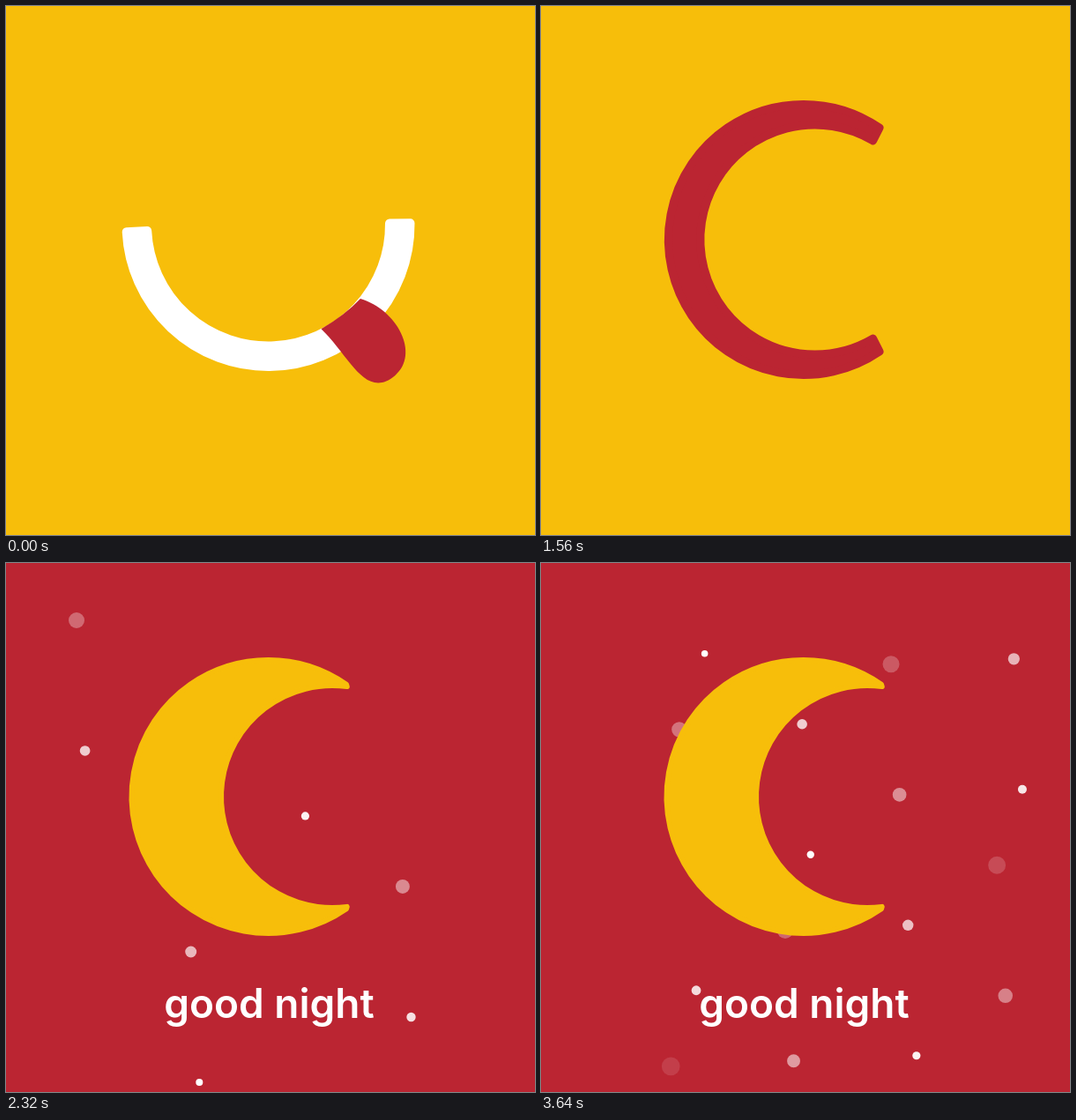
An HTML page with a canvas for the animation above (3680 ms loop, 600 px wide and 600 px high).

```html
<!DOCTYPE html>
<html lang="en">
<head>
<meta charset="utf-8">
<title>Good night</title>
<style>
html, body { margin: 0; width: 100%; height: 100%; overflow: hidden; background: #f7be0a; }
canvas { display: block; }
</style>
</head>
<body>
<canvas id="stage" width="600" height="600"></canvas>
<script>
const c = document.getElementById('stage').getContext('2d');
const YELLOW = '#f7be0a', RED = '#bb2532', LOOP = 3680, CX = 297.5;
const rad = d => d * Math.PI / 180;
const mix = (a, b, k) => a + (b - a) * k;
const clamp = k => Math.max(0, Math.min(1, k));
const ease = (t, from, to) => {
  const u = clamp((t - from) / (to - from));
  return u * u * (3 - 2 * u);
};

// Smooth curve through [time, value] points, flat at extremes and ends.
function track(...p) {
  const slope = i => {
    if (i < 1 || i > p.length - 2) return 0;
    const a = (p[i][1] - p[i - 1][1]) / (p[i][0] - p[i - 1][0]);
    const b = (p[i + 1][1] - p[i][1]) / (p[i + 1][0] - p[i][0]);
    return a * b <= 0 ? 0 : 2 * a * b / (a + b);
  };
  return t => {
    if (t <= p[0][0]) return p[0][1];
    const i = p.findIndex(q => q[0] >= t) - 1;
    if (i < 0) return p[p.length - 1][1];
    const [t0, a] = p[i], [t1, b] = p[i + 1], d = t1 - t0, u = (t - t0) / d;
    return mix(a, b, ease(u, 0, 1)) + d * u * (1 - u) * (slope(i) * (1 - u) - slope(i + 1) * u);
  };
}

const lick = track([360, 50], [520, -14], [640, 24.5], [720, 117], [880, 192], [1160, 294], [1240, 304], [1440, 294]);
const tailAngle = track([360, -2.5], [520, -25], [640, -8.5], [1040, 70], [1160, 54]);
const wax = track([1440, 0], [1840, .88], [2240, 1]);
const wobble = track([1520, 0], [1840, 1.2], [2000, -1.4], [2280, 0]);

// Evenly scattered dots, born one after another; each grows while it fades.
const STARS = 46, LIFE = 560, FIRST = 1880;
function drawStars(t) {
  c.fillStyle = '#fff';
  for (let i = 0; i < STARS; i++) {
    const age = (t - FIRST - (LOOP - FIRST) * (i / STARS) ** .8) / LIFE;
    if (age < 0 || age > 1) continue;
    c.globalAlpha = clamp(1.1 - age);
    c.beginPath();
    c.arc(80 + i * .7549 % 1 * 490, 65 + i * .5698 % 1 * 530, 3.5 + 7 * age, 0, 7);
    c.fill();
  }
  c.globalAlpha = 1;
}

// Ring segment with rounded corners; its inner circle slides right to form the moon.
function drawArc(m, color) {
  const w = mix(5, 3, m.wax), ro = m.outer - w, ri = m.inner + w;
  const inO = rad(mix(1.9, 1.2, m.wax)), inI = w / ri;
  c.beginPath();
  c.arc(CX, m.y, ro, rad(m.tail) + inO, rad(m.head) - inO);
  c.arc(CX + 72.5 * m.wax, m.y, ri, rad(mix(m.head + m.slant, 279, m.wax)) - inI,
    rad(mix(m.tail - m.slant, 81, m.wax)) + inI, true);
  c.closePath();
  c.fillStyle = c.strokeStyle = color;
  c.lineWidth = 2 * w;
  c.lineJoin = 'round';
  c.fill();
  c.stroke();
}

function drawTongue(t, m, angle) {
  const r = m.inner, out = 1 - ease(t, 1160, 1440);
  const tip = r + mix(20, mix(91, 83, m.settled), out);
  const b = mix(30, 38, ease(t, 360, 640)) - 13 * ease(t, 720, 900);
  c.save();
  c.translate(CX, m.y);
  c.rotate(rad(angle));
  c.beginPath();
  c.moveTo(r - b * b / 2 / r, b);
  c.bezierCurveTo(r + mix(15, 40, out), b - 5, tip, 44, tip, 0);
  c.bezierCurveTo(tip, -38, r + mix(15, 35, out), -50, r - 1, -26);
  c.quadraticCurveTo(r + 2, 0, r - b * b / 2 / r, b);
  c.fillStyle = RED;
  c.fill();
  c.restore();
}

function drawMouth(t, m, angle) {
  if (m.head <= angle + 13) drawArc(m, RED);
  else {
    drawArc(m, '#fff');
    if (t > 520) {
      c.save();
      c.beginPath();
      c.moveTo(CX, m.y);
      c.arc(CX, m.y, 300, rad(-50), rad(angle));
      c.clip();
      drawArc(m, RED);
      c.restore();
    }
  }
  drawTongue(t, m, angle);
}

function drawMoon(t, m, color) {
  const d = wobble(t);
  c.save();
  c.translate(CX + 4 * d, m.y);
  c.scale(1 - .018 * d, 1 + .008 * d);
  c.translate(-CX, -m.y);
  drawArc(m, color);
  c.restore();
}

function draw(t) {
  const k = ease(t, 360, 600), angle = lick(t), grown = wax(t);
  const m = {
    settled: k, wax: grown, y: mix(248, 265, k), slant: mix(.2, 1.6, k),
    outer: mix(166, 158, k), inner: mix(132.5, 126, k) - 3 * grown,
    tail: tailAngle(t), head: Math.max(mix(179, 185, k), angle + 12)
  };
  c.fillStyle = YELLOW;
  c.fillRect(0, 0, 600, 600);
  if (t < 1440) return drawMouth(t, m, angle);

  drawMoon(t, m, RED);
  if (t < 1850) return;
  c.save();
  c.beginPath();
  c.arc(308, 263, (t - 1850) * 2.28, 0, 7);
  c.clip();
  c.fillStyle = RED;
  c.fillRect(0, 0, 600, 600);
  drawStars(t);
  drawMoon(t, m, YELLOW);
  c.fillStyle = '#fff';
  c.font = '600 46px Inter, Roboto, sans-serif';
  c.textAlign = 'center';
  c.fillText('good night', 298.5, 516);
  c.restore();
}

const start = performance.now();
function tick() {
  draw((performance.now() - start) % LOOP);
  requestAnimationFrame(tick);
}
tick();
</script>
</body>
</html>
```
